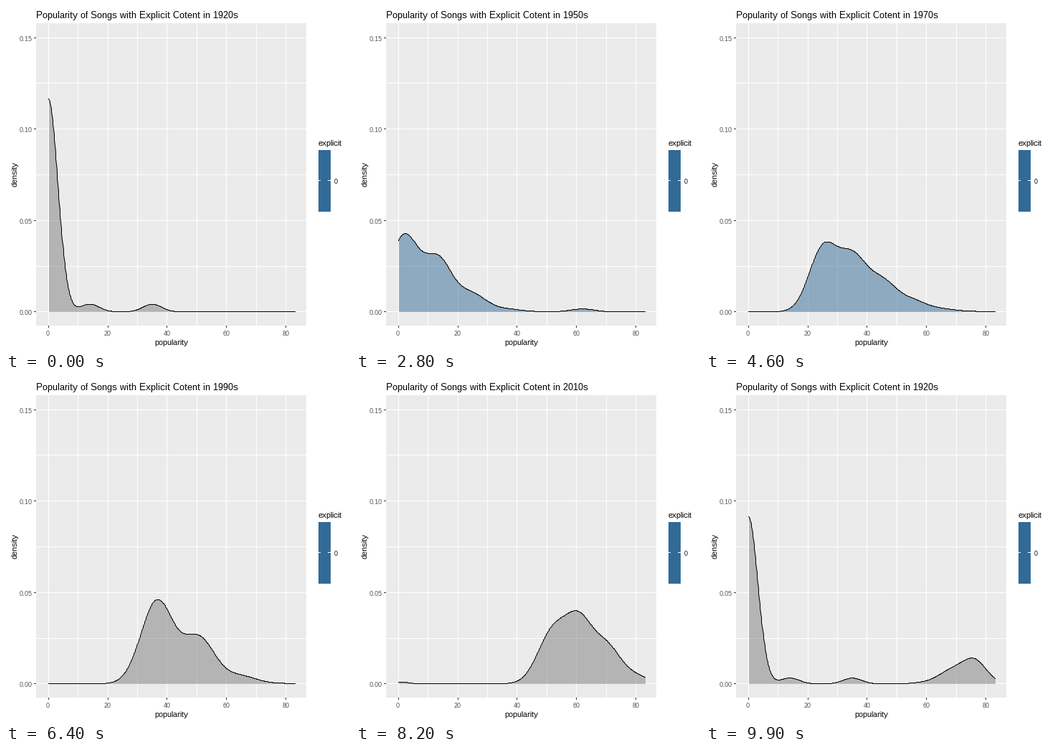
Animation of 480 by 480 pixels, one loop 10 s. Source, as a matplotlib script:

```python
import matplotlib.pyplot as plt
import numpy as np
from matplotlib.animation import FuncAnimation
from matplotlib.patches import Rectangle

SIZE, DPI, FRAMES, INTERVAL = 480, 100, 100, 100
PX = 72 / DPI                        # one pixel in points
X0, X_SCALE = 58.64, 4.144           # data to pixel mapping
Y0, Y_SCALE = 426.3, 2551
Y_LIMIT = 0.15                       # densities above this are dropped
HOLD = 5                             # still frames after each transition

GREY = np.array([0x7F, 0x7F, 0x7F]) / 255
BLUE = np.array([0x32, 0x6A, 0x97]) / 255

plt.rcParams.update({
    "font.family": "Liberation Sans",
    "text.hinting": "native",
    "text.hinting_factor": 1,
})

popularity = np.linspace(0, 83, 512)


def bump(center, width, height):
    return height * np.exp(-0.5 * ((popularity - center) / width) ** 2)


def bumps(centers, width, height):
    return sum(bump(c, width, height) for c in centers)


def ladder(start, gap, width, height, fall):
    """Evenly spaced bumps whose heights die away along a bell curve."""
    return sum(bump(start + k * gap, width, height * np.exp(-(k / fall) ** 2))
               for k in range(6))


CURVES = [
    bump(0, 3.2, .1165) + bumps((14, 35), 3.2, .0042),
    ladder(0, 1, .2, 1.3, .75) + ladder(2, 1, .2, .06, 2.5),
    ladder(0, 1, .222, 1.22, .72) + bumps((2, 6, 6, 7, 8, 9), .222, .0385)
    + bumps((5, 10, 14), .222, .0185),
    ladder(1.8, 11.5, 4.8, .041, 1.65) + bump(62, 4, .0016),
    ladder(18, 10.5, 6, .029, 2),
    ladder(25.2, 10, 4.7, .0345, 2.25),
    ladder(31, 12, 5.2, .035, 1.9),
    ladder(36.6, 14, 5.4, .0452, 1.3),
    ladder(45, 11, 5.5, .042, 1.3),
    bump(1, 2.5, .001) + bump(52, 5, .028) + ladder(61, 9.2, 4.5, .0315, 1.42),
    bump(0, 3.4, .0165) + ladder(76, -8, 4.1, .052, 1.2),
]
CURVES = [np.where(y > Y_LIMIT, np.nan, y) for y in CURVES]
YEARS = [1920 + 10 * k for k in range(len(CURVES))]
FILLS = [BLUE if 1950 <= year <= 1970 else GREY for year in YEARS]

STEPS = [5 if k < 2 else 4 for k in range(len(CURVES))]
STARTS = [HOLD * (k + 1) + sum(STEPS[:k]) for k in range(len(CURVES))]


def to_x(value):
    return np.round(X0 + X_SCALE * value)


def to_y(value):
    return np.round(Y0 - Y_SCALE * value)


fig = plt.figure(figsize=(SIZE / DPI, SIZE / DPI), dpi=DPI, facecolor="white")
ax = fig.add_axes([0, 0, 1, 1])
ax.set_xlim(0, SIZE)
ax.set_ylim(SIZE, 0)
ax.axis("off")


def rect(x, y, w, h, color):
    ax.add_patch(Rectangle((x, y), w, h, facecolor=color, linewidth=0, zorder=1))


def label(x, y, text, size, color="black", **kwargs):
    return ax.text(x, y, text, fontsize=size * PX, color=color,
                   va="baseline", **kwargs)


def draw_panel():
    rect(42, 24, 377, 422, "#EBEBEB")
    for value in range(0, 81, 10):
        x = to_x(value)
        rect(x, 24, 1, 422, "white")
        if value % 20 == 0:
            rect(x, 446, 1, 3, "#333333")
            label(X0 + X_SCALE * value, 460, str(value), 9, "#4D4D4D",
                  ha="center")
    for k in range(7):
        value = 0.025 * k
        y = to_y(value)
        rect(42, y, 377, 1, "white")
        if k % 2 == 0:
            rect(39, y, 3, 1, "#333333")
            label(36.5, y + 5, f"{value:.2f}", 9, "#4D4D4D", ha="right")
    label(230.5, 473, "popularity", 11, ha="center")
    label(16, 235, "density", 11, ha="center", rotation=90,
          rotation_mode="anchor")


def draw_legend():
    label(436, 195, "explicit", 11)
    rect(436, 201, 17, 86, BLUE)
    rect(436, 243, 3, 1, "white")
    rect(449, 243, 4, 1, "white")
    label(458, 248, "0", 9)


draw_panel()
draw_legend()
title = label(42, 17, "", 13)
line, = ax.plot([], [], color="black", linewidth=PX, snap=False, zorder=3)
area = None


def blend(a, b, t):
    return b if t == 1 else a + (b - a) * t


def state_at(frame):
    """Return the previous state, the next state and the progress between."""
    passed = sum(start <= frame for start in STARTS)
    if passed == 0:
        return 0, 0, 1
    k = passed - 1
    progress = min(1, (frame - STARTS[k] + 1) / STEPS[k])
    return k, passed % len(CURVES), progress


def update(frame):
    global area
    old, new, t = state_at(frame)
    # Whole pixel centres keep the outline crisp.
    xs = to_x(popularity) + 0.5
    ys = to_y(blend(CURVES[old], CURVES[new], t)) + 0.5
    if area is not None:
        area.remove()
    area = ax.fill_between(xs, ys, to_y(0) + 0.5, alpha=0.5, linewidth=0,
                           color=blend(FILLS[old], FILLS[new], t), zorder=2)
    line.set_data(xs, ys)
    year = YEARS[new if t > 0.5 else old]
    title.set_text(f"Popularity of Songs with Explicit Cotent in {year}s")
    return area, line, title


animation = FuncAnimation(fig, update, frames=FRAMES, interval=INTERVAL,
                          init_func=lambda: update(0), repeat=True,
                          repeat_delay=0, blit=False)
plt.show()
```
